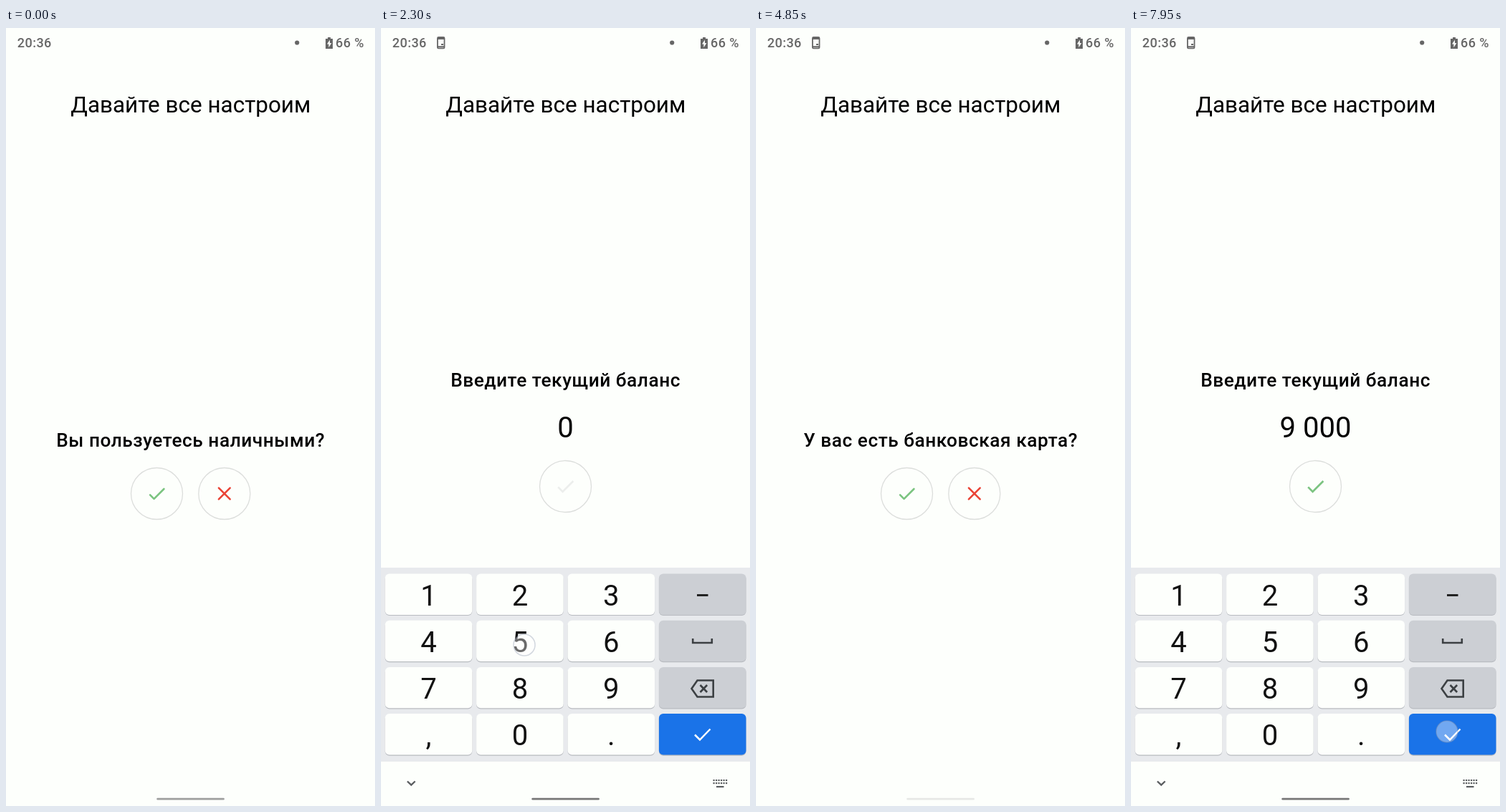
An HTML page for the animation above (8000 ms loop, 515 px wide and 1087 px high).

```html
<!DOCTYPE html>
<html lang="ru">
<head>
<meta charset="utf-8">
<title>Настройка</title>
<style>
  html, body { margin: 0; width: 100%; height: 100%; overflow: hidden; background: #fdfffc; }
  svg { display: block; width: 515px; height: 1087px; font-family: Roboto, sans-serif; }
  .mid { text-anchor: middle; }
  .ask { font-size: 26.2px; font-weight: 500; letter-spacing: .54px; text-anchor: middle; }
  .bar { font-size: 18px; font-weight: 500; letter-spacing: .45px; fill: #666; }
  .ring { fill: none; stroke: #dcdedc; stroke-width: 1.3; }
  .line { fill: none; stroke: #3c4043; stroke-width: 2.6; }
  .round { fill: none; stroke-width: 2; stroke-linecap: round; stroke-linejoin: round; }
</style>
</head>
<body>
<svg viewBox="0 0 515 1087">
  <defs>
    <path id="tick" d="M9 16.17L4.83 12l-1.42 1.41L9 19 21 7l-1.41-1.41z" transform="scale(1.31) translate(-12 -12)"/>
    <path id="softTick" class="round" d="M4.83 13.41L9 17.58 19.58 7" transform="scale(1.31) translate(-12 -12)"/>
    <path id="cross" class="round" d="M6 6l12 12M18 6L6 18" transform="scale(1.31) translate(-12 -12)"/>
    <g id="choice">
      <circle class="ring" cx="210.5" cy="650.5" r="36"/>
      <use href="#softTick" x="210.5" y="650.5" stroke="#7bc480"/>
      <circle class="ring" cx="304.8" cy="650.5" r="36"/>
      <use href="#cross" x="304.8" y="650.5" stroke="#ea4335"/>
    </g>
  </defs>
  <rect width="515" height="1087" fill="#fdfffc"/>

  <text class="bar" x="15.8" y="27.2">20:36</text>
  <g id="phone" fill="none" stroke="#666" stroke-width="1.8">
    <rect x="78.9" y="13" width="9.6" height="15.4" rx="1.4"/>
    <path d="M79 15h9.5M79 26.2h9.5M84 23h3"/>
  </g>
  <circle cx="406.2" cy="20.5" r="3.1" fill="#666"/>
  <path d="M446 15h3v-2h4v2h3v14h-10z" fill="#666"/>
  <path d="M452 16.5l-4 6h2.4v4.8l4-6.2h-2.4z" fill="#fdfffc"/>
  <text class="bar" x="460" y="27.2">66 %</text>

  <text class="mid" x="257.8" y="117.5" font-size="31.44">Давайте все настроим</text>

  <g id="cash">
    <text class="ask" x="257.6" y="585.3">Вы пользуетесь наличными?</text>
    <use href="#choice"/>
  </g>
  <g id="card">
    <text class="ask" x="257.6" y="585.3">У вас есть банковская карта?</text>
    <use href="#choice"/>
  </g>
  <g id="balance">
    <text class="ask" x="257.6" y="501.3">Введите текущий баланс</text>
    <text class="mid" id="value" x="257.5" y="572" font-size="40">0</text>
    <rect id="caret" y="530" width="2.8" height="52.5" fill="#81c784"/>
    <circle class="ring" cx="257.5" cy="640.5" r="36"/>
    <use href="#tick" x="257.5" y="640.5" fill="#eceeec"/>
    <use id="ready" href="#tick" x="257.5" y="640.5" fill="#7bc480"/>
  </g>

  <g id="pad">
    <rect y="754" width="515" height="271" fill="#e8eaed"/>
    <g id="keys"></g>
    <path d="M441 792.5h15.5" stroke="#222" stroke-width="3"/>
    <path class="line" d="M435.2 853v6h26.6v-6"/>
    <path class="line" d="M441.5 911.5H463.7V934.5H441.5L433.5 923zM445.5 918l9.6 10M455.1 918l-9.6 10"/>
    <path d="M438 987.5l7 7 14.5-15" fill="none" stroke="#fff" stroke-width="2.5"/>
  </g>
  <g id="tools" fill="#5a5d60">
    <path d="M36.8 1052.5l5.4 5.2 5.4-5.2" fill="none" stroke="#5a5d60" stroke-width="2.3"/>
    <g id="dots"></g>
    <rect x="468" y="1059" width="10.5" height="2.2"/>
  </g>
  <rect id="home" x="210.3" y="1075.8" width="94.5" height="2.7" rx="1.3" fill="#777"/>
  <circle id="tap" r="15" fill="#fff" fill-opacity=".38" stroke="#8c96ae" stroke-opacity=".38" stroke-width="1.5"/>
</svg>
<script>
const LOOP = 8000, MID = 257.5;
const $ = id => document.getElementById(id);
const clamp = v => Math.max(0, Math.min(1, v));
const ramp = (t, a, b) => clamp((t - a) / (b - a));
const fade = (id, v) => $(id).setAttribute('opacity', v.toFixed(3));

// [press, release, x, y]
const taps = [
  [650, 800, 212, 652],
  [2250, 2400, 200, 862], [2530, 2650, 198, 990], [2780, 2900, 198, 990],
  [3850, 3930, 443, 985],
  [5050, 5150, 212, 652],
  [6130, 6250, 328, 926], [6430, 6550, 199, 990], [6760, 6880, 198, 990], [7080, 7200, 198, 990],
  [7850, 8000, 441, 983]
];
const entries = [
  [0, '0'], [2400, '5'], [2650, '50'], [2900, '500'], [5000, '0'],
  [6250, '9'], [6550, '90'], [6880, '900'], [7200, '9\u00a0000']
];
// moments that restart the caret blink
const wakes = [1350, 2400, 2650, 2900, 5400, 6250, 6550, 6880, 7200];

function buildKeys() {
  let out = '';
  ['123', '456', '789', ',0.'].forEach((row, r) => {
    const y = 762.5 + r * 65.2;
    for (let c = 0; c < 4; c++) {
      const x = 5.7 + c * 127.4;
      const fill = c < 3 ? '#fdfffc' : r < 3 ? '#cccfd4' : '#1a73e8';
      const rect = (dy, f) => `<rect x="${x}" y="${y + dy}" width="121.6" height="57.4" rx="6" fill="${f}"/>`;
      out += rect(1.2, '#b8bbc0') + rect(0, fill);
      if (c < 3) out += `<text class="mid" x="${x + 60.8}" y="${y + 44.3}" font-size="40" fill="#111">${row[c]}</text>`;
    }
  });
  $('keys').innerHTML = out;
  let dots = '';
  for (let i = 0; i < 12; i++)
    dots += `<rect x="${463.5 + i % 6 * 3.5}" y="${i < 6 ? 1050 : 1054}" width="2.2" height="2.2"/>`;
  $('dots').innerHTML = dots;
}

function drawPad(t) {
  const start = t < 4500 ? 1312 : 5365;
  const p = ramp(t, start, start + 250);
  const leave = t < 4500 ? ramp(t, 3980, 4130) : 0;
  const drop = 33 * ((1 - p) ** 2 + leave ** 2);
  const alpha = (1 - (1 - p) ** 3) * (1 - leave);
  $('pad').setAttribute('transform', `translate(0 ${drop.toFixed(2)})`);
  fade('pad', alpha);
  const tone = .7 + .3 * ramp(t, 50, 450) - .83 * ramp(t, 4200, 4550) + .83 * ramp(t, 5600, 5950);
  fade('home', tone);
  fade('tools', alpha * tone);
}

function drawBalance(t) {
  const text = entries.filter(e => e[0] <= t).pop()[1];
  const value = $('value');
  if (value.textContent !== text) value.textContent = text;
  $('caret').setAttribute('x', MID + value.getComputedTextLength() / 2);
  const wake = wakes.filter(w => w <= t).pop() ?? t;
  fade('caret', (t - wake) % 1000 < 500 ? 1 : 0);
  fade('ready', t < 5000 ? ramp(t, 2400, 2480) : ramp(t, 6250, 6330));
  fade('balance', ramp(t, 1050, 1350) - ramp(t, 3980, 4130) + ramp(t, 5280, 5440));
}

function drawTap(t) {
  const tap = taps.find(([a, b]) => t >= a && t < b + 160);
  if (!tap) return fade('tap', 0);
  const [a, b, x, y] = tap;
  $('tap').setAttribute('cx', x);
  $('tap').setAttribute('cy', y);
  fade('tap', ramp(t, a - 20, a + 50) * (1 - ramp(t, b + 40, b + 160)));
}

function draw(t) {
  fade('phone', ramp(t, 50, 300));
  fade('cash', 1 - ramp(t, 850, 1100));
  fade('card', ramp(t, 4120, 4350) - ramp(t, 5180, 5320));
  drawBalance(t);
  drawPad(t);
  drawTap(t);
}

buildKeys();
draw(0);
const begin = performance.now();
(function tick() {
  draw((performance.now() - begin) % LOOP);
  requestAnimationFrame(tick);
})();
</script>
</body>
</html>
```
